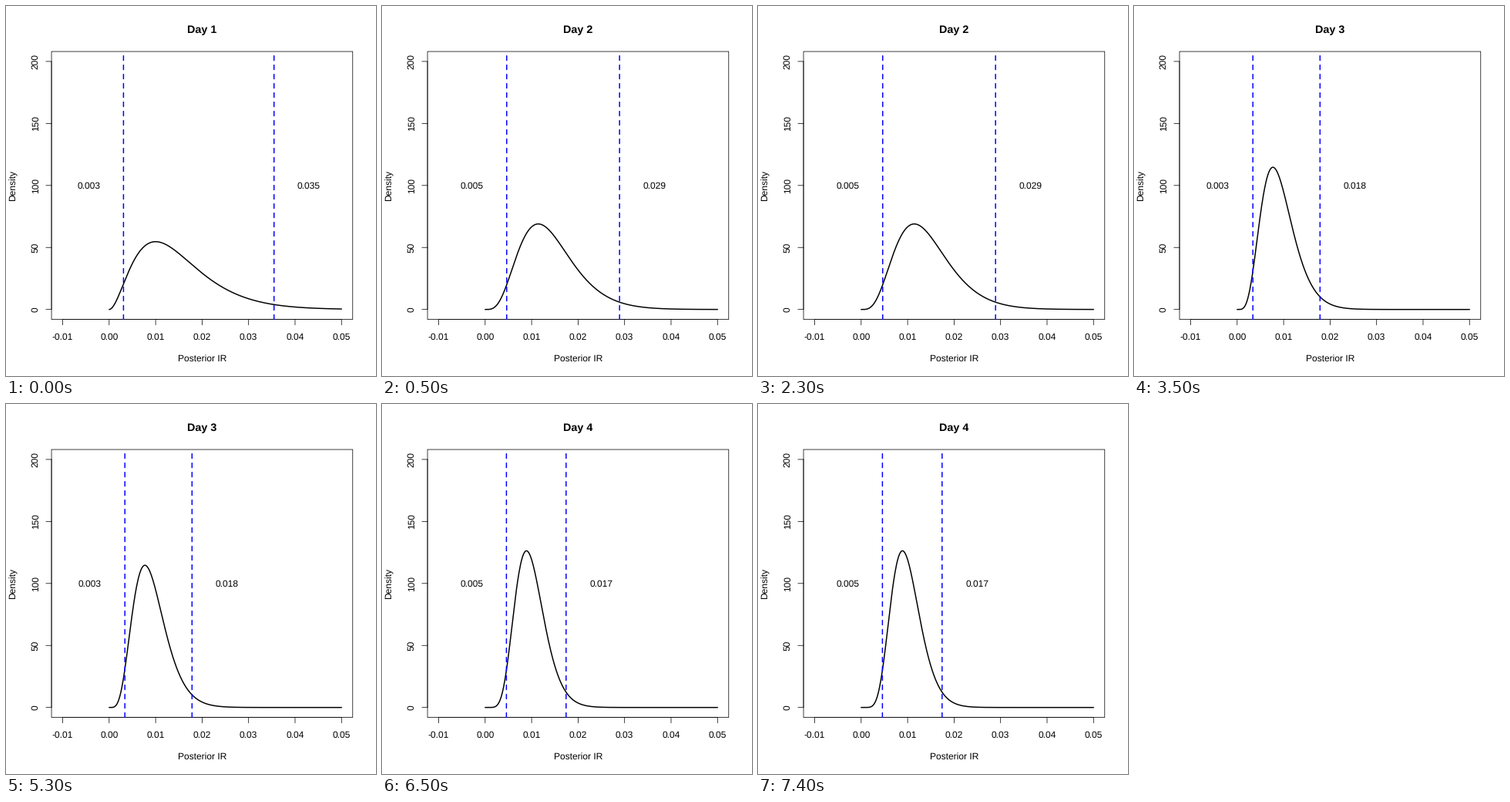
Write a matplotlib script that moves like this. It is 480x480 px and loops after 8 s.

```python
import math

import matplotlib.pyplot as plt
import numpy as np
from matplotlib.animation import FuncAnimation
from matplotlib.patches import Rectangle

plt.rcParams["font.family"] = "Liberation Sans"
plt.rcParams["text.hinting"] = "none"
plt.rcParams["axes.unicode_minus"] = False

SIZE, DPI = 480, 72            # 72 dpi, so one point is one pixel
LEFT, TOP, RIGHT, BOTTOM = 59.04, 59.04, 449.76, 406.56
LINE = 14.4                    # height of one margin line
TICK = LINE / 2
MID_X, MID_Y = (LEFT + RIGHT) / 2, (TOP + BOTTOM) / 2
THIN, THICK = 0.75, 1.5

# Running totals of (cases, people observed), one pair per day
TOTALS = [(2, 200), (4, 350), (5, 650), (8, 900)]
STEP = 500                     # ms per frame
FRAMES = 16


def to_x(value):
    return LEFT + (value + 0.0124) / 0.0648 * (RIGHT - LEFT)


def to_y(value):
    return BOTTOM - (value + 8) / 216 * (BOTTOM - TOP)


def beta_pdf(x, a, b):
    log_norm = math.lgamma(a + b) - math.lgamma(a) - math.lgamma(b)
    return np.exp(log_norm) * x ** (a - 1) * (1 - x) ** (b - 1)


def posterior(cases, people):
    """Density curve and 95% interval under a flat prior."""
    a, b = cases + 1, people - cases + 1
    grid = np.linspace(0, 0.1, 20001)
    cdf = np.cumsum(beta_pdf(grid, a, b))
    low, high = np.interp([0.025, 0.975], cdf / cdf[-1], grid)
    return beta_pdf(xs, a, b), low, high


xs = np.linspace(0, 0.05, 501)
days = [posterior(*total) for total in TOTALS]

fig = plt.figure(figsize=(SIZE / DPI, SIZE / DPI), dpi=DPI, facecolor="white")
ax = fig.add_axes([0, 0, 1, 1])
ax.set_xlim(0, SIZE)
ax.set_ylim(SIZE, 0)
ax.axis("off")


def stroke(x, y, width=THIN, color="black", **style):
    line, = ax.plot(x, y, color=color, lw=width, snap=False,
                    solid_capstyle="round", dash_capstyle="round",
                    solid_joinstyle="round", **style)
    return line


def label(x, y, text="", size=12, **style):
    return ax.text(x, y, text, size=size, ha="center", va="baseline",
                   rotation_mode="anchor", **style)


curve = stroke([], [], THICK)

# Axes with outward ticks
for value in np.arange(-1, 6) / 100:
    x = to_x(value)
    stroke([x, x], [BOTTOM, BOTTOM + TICK])
    label(x, BOTTOM + 1.8 * LINE, f"{value:.2f}")
for value in range(0, 201, 50):
    y = to_y(value)
    stroke([LEFT, LEFT - TICK], [y, y])
    label(LEFT - 1.2 * LINE, y, str(value), rotation=90)
stroke([to_x(-0.01), to_x(0.05)], [BOTTOM, BOTTOM])
stroke([LEFT, LEFT], [to_y(0), to_y(200)])

frame_box = Rectangle((LEFT, TOP), RIGHT - LEFT, BOTTOM - TOP, fill=False,
                      ec="black", lw=THIN, joinstyle="round", snap=False)
ax.add_patch(frame_box)
label(MID_X, BOTTOM + 3.8 * LINE, "Posterior IR")
label(LEFT - 3.2 * LINE, MID_Y, "Density", rotation=90)

title = label(MID_X, 34.7, size=14.4, weight="bold")
bounds = []
for side in (-1, 1):
    line = stroke([], [], THICK, "blue", linestyle=(0, (4, 4)))
    line.set_clip_path(frame_box)
    bounds.append((side, line, label(0, to_y(100) + 4.3)))


def draw(i):
    day = (i + 5) // 6
    density, *limits = days[day]
    title.set_text(f"Day {day + 1}")
    curve.set_data(to_x(xs), to_y(density))
    for (side, line, text), limit in zip(bounds, limits):
        x = to_x(limit)
        line.set_data([x, x], [BOTTOM, TOP])
        text.set_x(to_x(limit + side * 0.0075))
        text.set_text(f"{limit:.3f}")
    return []


anim = FuncAnimation(fig, draw, frames=FRAMES, interval=STEP, repeat=True,
                     repeat_delay=0)
plt.show()
```
